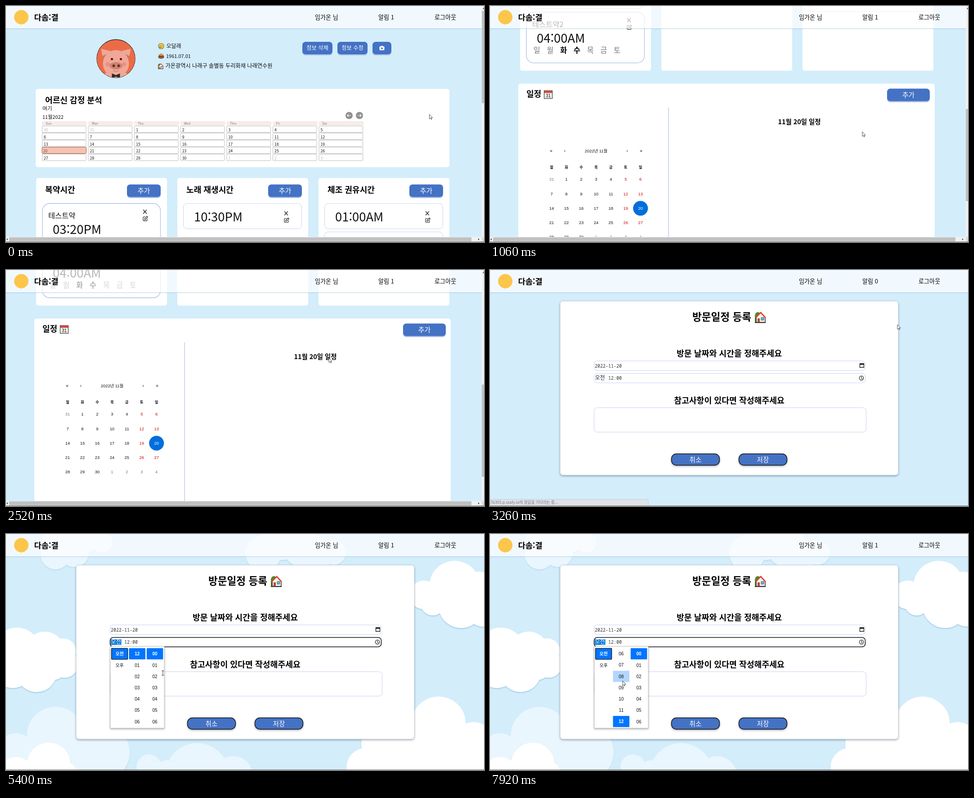
These frames come from a looping animation (1063 by 527 pixels, 7.99 s). An HTML page:

```html
<!DOCTYPE html>
<html lang="ko">
<head>
<meta charset="utf-8">
<title>방문일정 등록</title>
<style>
html, body { margin: 0; width: 100%; height: 100%; overflow: hidden; background: #d3edfb; }
svg { display: block; width: 1063px; height: 527px; }
text { font-family: "Noto Sans CJK KR", "Noto Sans CJK", sans-serif; fill: #111; white-space: pre; }
.b { font-weight: 700; fill: #000; }
.s { font-weight: 500; fill: #000; }
.l { font-weight: 300; }
.m { text-anchor: middle; }
.w { fill: #fff; }
.g { fill: #777; }
.f { fill: #bbb; }
.r { fill: #d10000; }
.a { font-family: "Liberation Sans", "Noto Sans CJK KR", sans-serif; }
.o { font-family: "Noto Sans Mono", "Noto Sans CJK KR", monospace; fill: #333; }
.cloud { filter: drop-shadow(0 2px 1px rgba(80, 150, 195, .35)); fill: #fff; }
.card { filter: drop-shadow(0 2px 2px rgba(0, 0, 0, .3)); }
</style>
</head>
<body>
<svg id="stage" viewBox="0 0 1063 527"></svg>
<script>
const LOOP = 7990, ROW = 25.2, LIST_TOP = 255;
const BLUE = '#4472c4', PALE = '#bccbe8';

const text = (x, y, size, s, cls = '') =>
  `<text x="${x}" y="${y}" font-size="${size}" class="${cls}">${s}</text>`;
const box = (x, y, w, h, r, fill, stroke = 'none', sw = 1) =>
  `<rect x="${x}" y="${y}" width="${w}" height="${h}" rx="${r}" fill="${fill}" stroke="${stroke}" stroke-width="${sw}"/>`;
const dot = (x, y, r, fill, ry = r) =>
  `<ellipse cx="${x}" cy="${y}" rx="${r}" ry="${ry}" fill="${fill}"/>`;
const line = (d, stroke = '#111', w = 1, fill = 'none') =>
  `<path d="${d}" stroke="${stroke}" stroke-width="${w}" fill="${fill}"/>`;
const shape = (d, fill) => `<path d="${d}" fill="${fill}"/>`;
const at = (x, y, s, scale = 1) => `<g transform="translate(${x} ${y}) scale(${scale})">${s}</g>`;
const times = (n, fn) => Array.from({ length: n }, (_, i) => fn(i)).join('');

const button = (x, y, w, label, size) =>
  box(x, y + 2.5, w, 28, 7, '#b5c7ea') + box(x, y, w, 28, 7, BLUE) +
  text(x + w / 2, y + 14 + size * .36, size, label, 'm w');

// Icons, drawn around their centre
const house = shape('M-12 11V-3Q-12 -12 -4 -12L2 -8L0 11Z', '#4c8a2b') +
  line('M-9 11V0L1 -11L11 0V11Z', '#222', 1.4, '#f5f0ea') +
  line('M-11 1L1 -11L12 1', '#d8432e', 2.6) +
  box(-6, 2, 5, 9, 0, '#b5502c') + box(2, 0, 6, 6, 0, '#57b5e6', '#345', .7) +
  line('M-12 11.5H12', '#222', 1.6);
const sadFace = dot(0, 0, 6.6, '#333') + dot(0, 0, 5.9, '#fbc83c') +
  dot(-2.2, -.8, .8, '#333') + dot(2.2, -.8, .8, '#333') +
  line('M-2 3.2Q0 1.6 2 3.2', '#333', .8) + dot(-3, 3, 1.4, '#3a9be0', 2.2);
const cake = dot(0, 3, 6.6, '#333', 3.4) + dot(0, 2.6, 6, '#a5612f', 3) +
  box(-5.5, -2, 11, 5, 2, '#7a4422') + dot(0, -2, 5.5, '#d39a5c', 2) +
  line('M0 -6V-2', '#e25d3d', 1.3);
const calendarIcon = box(-9, -8.5, 18, 17.5, 0, '#f4f4f4', '#333', 1.2) +
  box(-8.4, -8, 16.8, 4.6, 0, '#d9472f') + text(0, 6.5, 10, '31', 'm a');
const cross = line('M-3.8 -4.4L3.8 4.4M3.8 -4.4L-3.8 4.4', '#111', 1.4);
const edit = line('M-.5 -3.8H-3.5Q-5 -3.8 -5 -2.3V3.5Q-5 5 -3.5 5H2.5Q4 5 4 3.5V.8', '#111', 1.1) +
  line('M-2 2.2L-1.5 -.2L3.3 -5L5.3 -3L.5 1.8Z', '#111', 1.1);
const camera = box(-5.5, -3.8, 11, 8.5, 1.4, '#fff') + box(-2.5, -5, 5, 3, 1, '#fff') + dot(0, .5, 2.1, BLUE);
const disc = dir => dot(0, 0, 8, '#909090') +
  `<g transform="scale(${dir} 1)">${line('M-4 0H4M1 -3L4 0L1 3', '#fff', 1.2)}</g>`;
const tools = (x, y) => at(x, y, cross) + at(x + 1, y + 15.3, edit);

const pig = `<clipPath id="face"><circle r="42.6"/></clipPath>` + dot(0, 0, 43.2, '#1c1413') +
  `<g clip-path="url(#face)">${dot(0, 1, 43, '#ea6b47')}
  ${shape('M-33 -22L-12 -17L-27 2Z M33 -22L12 -17L27 2Z', '#bd7d6a')}
  ${shape('M-33 -22L-12 -17L-17 -12L-30 -6Z M33 -22L12 -17L17 -12L30 -6Z', '#f0a797')}
  ${dot(0, 44, 30, '#f0a797', 18)}${dot(0, 11, 29, '#f0a797', 30)}
  ${dot(-18, 13, 5, '#ec8f83')}${dot(18, 13, 5, '#ec8f83')}
  ${dot(-9, 1, 2.6, '#6b1512')}${dot(11, 1, 2.6, '#6b1512')}
  ${dot(0, 16, 14, '#c98472', 8)}${dot(-5, 16, 2.8, '#6b2a1e', 3)}${dot(6, 16, 2.8, '#6b2a1e', 3)}
  ${line('M-6 27Q0 30 6 27', '#b96f61', 1)}
  ${shape('M-9 33L0 37L9 33V44L0 40L-9 44Z', '#2c2a2c')}</g>`;

const profile = at(244.5, 117.5, pig) +
  at(345, 89.5, sadFace) + text(356.5, 94, 12, '오달래') +
  at(345, 111, cake) + text(356, 116, 11, '1961.07.01') +
  at(344, 134.5, house, .5) + text(354.5, 138, 12.2, '가온광역시 나래구 솔별동 두리화재 나래연수원') +
  button(659, 80, 67, '정보 삭제', 12.3) + button(737, 80, 67, '정보 수정', 12.3) +
  button(815, 80, 42, '', 12) + at(836, 94, camera);

const moodCell = i => {
  const n = i - 1, x = 80.5 + 102.6 * (i % 7), y = 268 + 15.7 * Math.floor(i / 7);
  const today = n === 20, day = n < 1 ? 30 + n + 1 : n > 30 ? n - 30 : n;
  return (today ? box(x - .5, y, 98.5, 14.4, 2, '#f4c3b4', '#a4593f')
                : box(x, y, 97.5, 14.6, 1.5, '#fff', '#b4b4b4', .9)) +
    `<g ${today ? 'opacity=".65"' : ''}>` +
    text(x + (today ? 2 : 3.5), y + 12.2, 8.6, day, n < 1 || n > 30 ? 'f' : '') + '</g>';
};
const mood = box(66, 185, 920, 175, 5, '#fff') +
  text(87, 217, 18.1, '어르신 감정 분석', 'b') + text(81, 233, 11.6, '여기') + text(81, 252, 11, '11월2022') +
  at(763, 244.5, disc(-1)) + at(786, 244.5, disc(1)) +
  ['Sun', 'Mon', 'Thu', 'Wed', 'Thrs', 'Fri', 'Sat'].map((d, i) =>
    box(80 + 102.6 * i, 257, 100, 10, 4, '#f7ece8') + text(88.5 + 102.4 * i, 264.6, 7, d, 's g')).join('') +
  times(35, i => moodCell(i + .0));

const column = (x, title) => box(x, 384, 291, 309, 5, '#fff') +
  text(x + 20, 417, 18.1, title, 'b') + button(x + 202, 398.5, 75, '추가', 15);
const pill = (y, name, time, picked) => box(81, y, 262.5, 113.5, 16, '#fff', '#aebfe4', 1.3) +
  text(94, y + 33, 16.4, name) + text(104, y + 68, 27.4, time, 'l') +
  [...'일월화수목금토'].map((d, i) =>
    text(104 + 29.75 * i, y + 91.5, 16.5, d, picked.includes(d) ? 'm b' : 'm g')).join('') +
  tools(309, y + 18.3);
const slot = (x, y, time) => box(x, y, 263, 56.5, 8, '#fff', '#c6d3ec') +
  text(x + 23.5, y + 40, 27.4, time, 'l') + tools(x + 228.5, y + 22);
const timesPanel = column(67, '복약시간') + column(381, '노래 재생시간') + column(695, '체조 권유시간') +
  pill(441, '테스트약', '03:20PM', '일토') + pill(562, '테스트약2', '04:00AM', '화수') +
  slot(394.5, 441, '10:30PM') + slot(708.5, 441, '01:00AM') + slot(708.5, 504.5, '06:00PM');

const dayCell = i => {
  const n = i, x = 137 + 32.95 * (i % 7), y = 938.8 + 32.2 * Math.floor(i / 7);
  const other = n < 1 || n > 30, day = n < 1 ? 31 : n > 30 ? n - 30 : n;
  const cls = n === 20 ? 'w' : other ? 'g' : i % 7 > 4 ? 'r' : '';
  return (n === 20 ? dot(x, y - 3, 16.5, '#006edc') : '') + text(x, y, 9.4, day, 'm a ' + cls);
};
const plan = box(63, 722, 926, 560, 5, '#fff') + text(81, 751, 18, '일정', 'b') + at(129.5, 746, calendarIcon) +
  button(883, 733, 95, '추가', 15) + line('M397 775V1300', PALE, 1.5) +
  text(688, 812, 14.4, '11월 20일 일정', 'm b') +
  [['«', 136], ['‹', 166.5], ['›', 305], ['»', 336]].map(([s, x]) => text(x, 875, 10, s, 'm a')).join('') +
  text(236, 875.5, 9.4, '2022년 11월', 'm a') +
  [...'월화수목금토일'].map((d, i) => text(137 + 32.95 * i, 911.5, 8, d, 'm b')).join('') +
  times(35, dayCell);

const scrollbars = box(1058, 0, 5, 527, 0, '#f1f1f1') +
  `<rect id="thumb" x="1058" y="11" width="5" height="206" fill="#c1c1c1"/>` +
  shape('M1060 7L1063 3V7Z', '#555') +
  box(0, 515.5, 1063, 11, 0, '#f1f1f1') + box(7, 516.5, 1028, 9, 0, '#c1c1c1') +
  shape('M1 521L4 518.5V523.5Z M1053 521L1050 518.5V523.5Z', '#555') + box(1058, 515.5, 5, 11, 0, '#dcdcdc');

// Each cloud is a flat run of x, y, r
const cloud = (opacity, ...v) => `<g class="cloud" opacity="${opacity}">` +
  times(v.length / 3, i => `<circle cx="${v[i * 3]}" cy="${v[i * 3 + 1]}" r="${v[i * 3 + 2]}"/>`) + '</g>';
const sky = cloud(.5, 110, 46, 33, 152, 42, 32, 170, 5, 40, 214, 19, 23, 120, 8, 40) +
  cloud(.5, 572, 43, 40, 612, 12, 46, 660, 30, 44, 700, 45, 30, 729, 42, 27) +
  cloud(.5, 213, 488, 62, 110, 450, 64, 22, 490, 45, 150, 520, 70) +
  cloud(.5, 318, 520, 28, 425, 538, 71, 505, 540, 44, 360, 545, 40) +
  cloud(1, 998, 117, 57, 929, 136, 32, 949, 155, 27, 1012, 160, 50, 1052, 118, 34, 1060, 175, 32) +
  cloud(1, 24, 262, 53, 86, 263, 45, 127, 262, 29, 130, 290, 31, 15, 296, 48, 68, 308, 45, 105, 296, 30) +
  cloud(1, 95, 515, 49, 22, 540, 42, 125, 540, 34) +
  cloud(1, 962, 424, 61, 1040, 466, 46, 850, 470, 60, 800, 521, 43, 930, 500, 70, 1010, 520, 70);

const formButton = (x, label) =>
  `<g class="card">${box(x, 410.5, 107, 25.5, 11, BLUE, '#111', 1.4)}</g>` + text(x + 53.5, 428.8, 14.6, label, 'm w');
const form = `<g class="card">${box(156, 69.5, 752, 388.5, 6, '#fff', '#b9cbe3', .8)}</g>` +
  text(450, 112.5, 22.6, '방문일정 등록', 'b') + at(601, 106, house, 1) +
  text(532, 192.5, 18.3, '방문 날짜와 시간을 정해주세요', 'm b') +
  box(231.5, 203, 603, 21.5, 7, '#fff', '#c3d1ed') + text(233, 217.5, 10, '2022-11-20', 'o') +
  line('M822.5 209.5H831.5V217.5H822.5Z', '#111', 1.3) + box(822, 208.5, 10, 3, 0, '#111') +
  `<rect id="timeBox" x="231.5" y="231" width="603" height="21" rx="7" fill="#fff"/>` +
  `<rect id="mark" x="233" y="235" width="23.5" height="12.5" fill="#0078d7"/>` +
  `<text id="ampm" x="233.5" y="245" font-size="12" class="l">오전</text>` + text(263, 245, 10, '12:00', 'o') +
  line('M826 238V241.5L828.5 243', '#111', 1.1) + `<circle cx="826" cy="241.3" r="4.6" fill="none" stroke="#111" stroke-width="1.2"/>` +
  text(532, 297.5, 18.3, '참고사항이 있다면 작성해주세요', 'm b') +
  box(231.5, 307.5, 605, 54.5, 7, '#fff', '#c3d1ed') +
  formButton(403.5, '취소') + formButton(553.5, '저장');

const pad = n => String(n).padStart(2, '0');
const option = (x, k, label, on) => {
  const y = LIST_TOP + k * ROW;
  return (on ? box(x, y, 36.5, ROW - .2, 1, '#0075ff') : '') +
    text(x + 18.3, y + 16.3, 10, label, 'm a ' + (on ? 'b on' : ''));
};
const picker = `<g class="card">${box(232, 251, 120, 182.5, 0, '#fff', '#b5b5b5', .8)}</g>` +
  option(234.3, 0, '오전', true) + box(234.6, 255.4, 36, 24.4, 1, 'none', '#111', 1.3) + option(234.3, 1, '오후') +
  `<clipPath id="list"><rect x="232" y="${LIST_TOP}" width="120" height="${ROW * 7}"/></clipPath>
  <g clip-path="url(#list)"><g id="hours">
  <rect id="hover" x="273.5" width="36.5" height="25" fill="#b3d6ff"/>
  ${times(16, k => option(273.5, k, pad(k % 12 || 12), k % 12 === 0))}</g>
  ${times(7, k => option(312.8, k, pad(k), k === 0))}</g>`;

const header = box(0, 0, 1063, 50, 0, 'rgba(255,255,255,.7)') +
  box(0, 50, 1063, 1, 0, 'rgba(120,160,190,.4)') + box(0, 51, 1063, 1, 0, 'rgba(120,160,190,.12)') +
  dot(34, 25, 16, '#fcc64b') + text(62.5, 32, 17.6, '다솜:결', 'b') +
  text(687, 30, 13.1, '임가온 님', 's') + text(828, 30, 13.1, '알림 <tspan id="count">1</tspan>', 's') +
  text(953, 30, 13.1, '로그아웃', 's');

stage.innerHTML = `<style>.on { fill: #fff }</style>
<rect width="1063" height="527" fill="#d3edfb"/>
<g id="home"><g id="page">${profile}${mood}${timesPanel}${plan}</g></g>
<g id="visit"><g id="clouds">${sky}</g>${form}<g id="drop">${picker}</g></g>
${header}
<g id="bars">${scrollbars}</g>
<g id="status">${box(-2, 512, 354, 17, 2, '#dee1e6', '#c4c8cd', .8)}${text(-4, 522, 8.6, 'k7b303.p.ssafy.io의 응답을 기다리는 중...', 'g')}</g>
${box(0, 526, 1063, 1, 0, '#777')}
<g id="mouse"><path id="arrow" d="M0 0V10.2L2.4 8.1L4 11.4L5.5 10.8L4 7.5H7Z" fill="#fff" stroke="#222" stroke-width=".8"/>
<path id="beam" d="M-2.5 -5H2.5M0 -5V5M-2.5 5H2.5" stroke="#333" fill="none"/></g>`;

const scrollKeys = [[70, 0], [650, 419], [920, 510], [1300, 613.5]];
const hourKeys = [[6300, 0], [6880, 162.4], [7150, 162.4], [7400, 151.2]];
const mouseKeys = [[70, 941.5, 242], [650, 935, 268], [900, 925, 270], [1560, 527, 315], [1720, 527, 315],
  [2100, 600, 290], [2460, 683, 220], [2750, 850, 107], [2990, 906, 122], [3300, 906, 122], [3920, 521, 317],
  [4060, 521, 317], [4600, 832, 214], [4850, 830.5, 241], [5000, 830.5, 241], [5400, 349, 310.5],
  [5730, 303, 302], [6190, 291, 298], [6330, 291, 300], [6880, 293, 373], [7190, 293, 373],
  [7450, 295, 341], [7700, 295, 340], [7900, 295, 328]];

function track(keys, t, c = 1) {
  const i = keys.findIndex(k => k[0] > t);
  if (i === 0) return keys[0][c];
  if (i < 0) return keys[keys.length - 1][c];
  const [a, b] = [keys[i - 1], keys[i]];
  return a[c] + (b[c] - a[c]) * (t - a[0]) / (b[0] - a[0]);
}
const el = id => document.getElementById(id);
const show = (id, on) => { el(id).style.display = on ? '' : 'none'; };
const set = (id, name, v) => el(id).setAttribute(name, v);

function render(t) {
  const x = track(mouseKeys, t, 1), y = track(mouseKeys, t, 2);
  const scroll = track(scrollKeys, t), spin = track(hourKeys, t);
  const form = t >= 3140, loaded = t >= 3400, focus = t >= 5000, beam = t >= 4850 && t < 5450;

  show('home', !form); show('bars', !form); show('visit', form);
  show('clouds', loaded); show('status', form && !loaded);
  el('count').textContent = form && !loaded ? 0 : 1;
  set('page', 'transform', `translate(0 ${-scroll})`);
  set('thumb', 'y', 11 + scroll * .399);

  show('drop', focus); show('mark', focus);
  set('timeBox', 'stroke', focus ? '#111' : '#c3d1ed');
  set('timeBox', 'stroke-width', focus ? 1.6 : 1);
  el('ampm').style.fill = focus ? '#fff' : '#222';
  set('hours', 'transform', `translate(0 ${-spin})`);
  set('hover', 'y', LIST_TOP + ROW * Math.floor((y - LIST_TOP + spin) / ROW));
  show('hover', !beam && x > 273 && x < 310);

  set('mouse', 'transform', `translate(${x} ${y})`);
  show('beam', beam); show('arrow', !beam);
}

const start = performance.now();
(function tick() {
  render((performance.now() - start) % LOOP);
  requestAnimationFrame(tick);
})();
</script>
</body>
</html>
```
